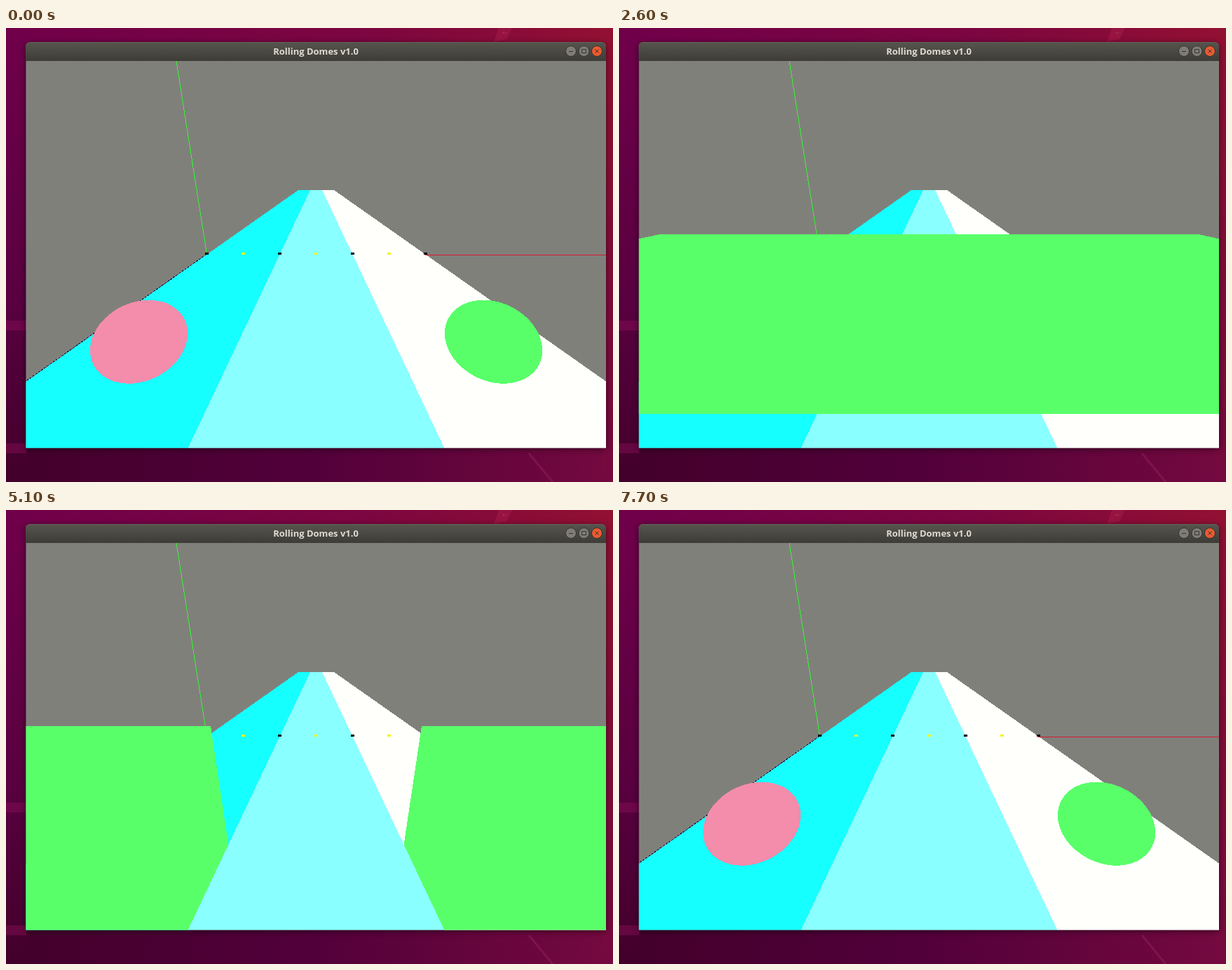
These frames come from a looping animation (866x647 px, 8000 ms). An HTML page:

```html
<!DOCTYPE html>
<html lang="en">
<head>
<meta charset="utf-8">
<title>Rolling Domes</title>
<style>
  html, body { margin: 0; width: 100%; height: 100%; overflow: hidden; background: #5a003c; }
  svg { display: block; position: absolute; left: 0; top: 0; }
  .window {
    position: absolute; left: 28px; top: 20px; width: 828px; height: 578px;
    border-radius: 6px 6px 0 0;
    box-shadow: 0 2px 9px rgba(0, 0, 0, .55);
  }
  .bar {
    position: absolute; inset: 0 0 auto; height: 27px; box-sizing: border-box;
    border-radius: 6px 6px 0 0; border-top: 1px solid #64635b;
    background: linear-gradient(#55544c, #3d3c37);
    color: #dfdbd2; text-align: center;
    font: 700 13px/25px "Open Sans", "Noto Sans", sans-serif;
  }
  .scene { shape-rendering: crispEdges; }
</style>
</head>
<body>
<svg width="866" height="647" viewBox="0 0 866 647">
  <defs>
    <linearGradient id="top"><stop stop-color="#70004a"/><stop offset=".6" stop-color="#7c0640"/><stop offset="1" stop-color="#921032"/></linearGradient>
    <linearGradient id="bottom"><stop stop-color="#42002b"/><stop offset=".5" stop-color="#52003a"/><stop offset="1" stop-color="#74093f"/></linearGradient>
    <linearGradient id="left" x2="0" y2="1"><stop stop-color="#70004a"/><stop offset=".6" stop-color="#590040"/><stop offset="1" stop-color="#42002b"/></linearGradient>
    <linearGradient id="right" x2="0" y2="1"><stop stop-color="#921032"/><stop offset="1" stop-color="#74093f"/></linearGradient>
  </defs>
  <rect width="866" height="30" fill="url(#top)"/>
  <rect y="590" width="866" height="57" fill="url(#bottom)"/>
  <rect width="30" height="647" fill="url(#left)"/>
  <rect x="850" width="16" height="647" fill="url(#right)"/>
  <path d="M0 417H29V431H0ZM0 592H29V606H0Z" fill="#8a1058" opacity=".45"/>
  <path d="M696 20L703 0H722L714 16Z" fill="#b02050" opacity=".4"/>
  <path d="M709 7h1M712 7h1" stroke="#d06a88"/>
  <path d="M746 606L780 647" stroke="#92205a" stroke-width="3" opacity=".5"/>
</svg>

<div class="window"><div class="bar">Rolling Domes v1.0</div></div>

<svg width="866" height="647" viewBox="0 0 866 647">
  <g stroke="#35342f">
    <circle cx="806" cy="33" r="7.5" fill="#7e7c74"/>
    <circle cx="824.5" cy="33" r="7.5" fill="#7e7c74"/>
    <circle cx="843" cy="33" r="7.5" fill="#ea5a31"/>
    <path d="M803 33.5h6M821.5 30.5h6v5h-6zM840.5 30.5l5 5M845.5 30.5l-5 5" fill="none"/>
  </g>
  <clipPath id="view"><rect x="28.5" y="47" width="827.5" height="551.5"/></clipPath>
  <g class="scene" clip-path="url(#view)">
    <rect x="28" y="47" width="829" height="552" fill="#80807b"/>
    <polygon id="lane0" fill="#16ffff"/>
    <polygon id="lane1" fill="#8affff"/>
    <polygon id="lane2" fill="#fffffc"/>
    <path d="M286 322.5L28 503.5" stroke="#101040" stroke-dasharray="3 2"/>
    <path d="M598 323H857" stroke="#d8182c"/>
    <path d="M286.5 322L243 47" stroke="#32f532"/>
    <g id="dots"></g>
    <polygon id="far" fill="#59ff69"/>
    <polygon id="far2" fill="#59ff69"/>
    <ellipse rx="72.6" ry="55.9" fill="#f48cab" transform="translate(189.6 447.2) rotate(-26.2)"/>
    <ellipse rx="72.6" ry="55.9" fill="#59ff69" transform="translate(695.6 447.2) rotate(26.2)"/>
    <polygon id="near" fill="#59ff69"/>
    <polygon id="near2" fill="#59ff69"/>
  </g>
</svg>

<script>
const LOOP = 8000, STEP = 100;
const FOCAL = 328.3, CX = 442.5, CY = 322.5;
const HEIGHT = 0.7, DEPTH = 0.5, BALL_Z = 1.9;
const $ = id => document.getElementById(id);

// Camera at (1.5, 1, 3) looking at (1.5, 0, 0); lanes are one unit wide.
function project(x, y, z) {
  const d = 10 - y - 3 * z;
  return [CX + FOCAL * Math.sqrt(10) * (x - 1.5) / d, CY - FOCAL * (3 * y - z) / d];
}

function setPoints(id, points) {
  $(id).setAttribute('points', points.map(p => p.map(v => v.toFixed(2)).join()).join(' '));
}

function hull(points) {
  const half = list => {
    const out = [];
    for (const p of list) {
      while (out.length > 1) {
        const [a, b] = out.slice(-2);
        if ((b[0] - a[0]) * (p[1] - a[1]) - (b[1] - a[1]) * (p[0] - a[0]) > 0) break;
        out.pop();
      }
      out.push(p);
    }
    return out.slice(0, -1);
  };
  const sorted = [...points].sort((a, b) => a[0] - b[0] || a[1] - b[1]);
  return [...half(sorted), ...half(sorted.reverse())];
}

function box([x0, x1], z) {
  const corners = [];
  for (const x of [x0, x1])
    for (const y of [0, HEIGHT])
      for (const d of [0, DEPTH]) corners.push(project(x, y, z - d));
  return hull(corners);
}

// Each wall: the lanes it blocks and [time, z of its front face].
const walls = [
  { spans: [[0, 3]], end: 2700,
    keys: [[600, -16.5], [1400, -8.75], [1700, -6.3], [2300, -0.12], [2600, 2.25]] },
  { spans: [[0, 1], [2, 3]], end: 5200,
    keys: [[3100, -17], [3900, -9.6], [4100, -7.2], [4200, -7.2], [4300, -5.5], [4500, -3.5], [5100, 2.45]] },
  { spans: [[0, 2]], end: 7700,
    keys: [[5600, -17], [6400, -9.6], [6600, -7.6], [7300, -0.8], [7600, 2.65]] }
];

function along(keys, t) {
  const i = Math.max(1, keys.findIndex(k => k[0] >= t));
  const [t0, z0] = keys[i - 1], [t1, z1] = keys[i];
  return z0 + (z1 - z0) * (t - t0) / (t1 - t0);
}

function draw(t) {
  const wall = walls.find(w => t >= w.keys[0][0] && t < w.end);
  const z = wall ? along(wall.keys, t) : 0;
  const layer = z > BALL_Z ? 'near' : 'far';
  for (const name of ['far', 'near'])
    ['', '2'].forEach((suffix, i) => {
      const span = wall && name === layer && wall.spans[i];
      setPoints(name + suffix, span ? box(span, z) : []);
    });
}

for (let i = 0; i < 3; i++)
  setPoints('lane' + i, [[i, -17], [i + 1, -17], [i + 1, 2.8], [i, 2.8]].map(([x, z]) => project(x, 0, z)));

for (let i = 0; i < 7; i++) {
  const dot = document.createElementNS('http://www.w3.org/2000/svg', 'rect');
  const [x] = project(i / 2, 0, 0);
  const attrs = { x: Math.round(x - 2.5), y: 320, width: 5, height: 3, fill: i % 2 ? '#f4f41c' : '#000' };
  for (const key in attrs) dot.setAttribute(key, attrs[key]);
  $('dots').append(dot);
}

const start = performance.now();
function tick() {
  const t = (performance.now() - start) % LOOP;
  draw(Math.floor(t / STEP) * STEP);
  requestAnimationFrame(tick);
}
tick();
</script>
</body>
</html>
```
